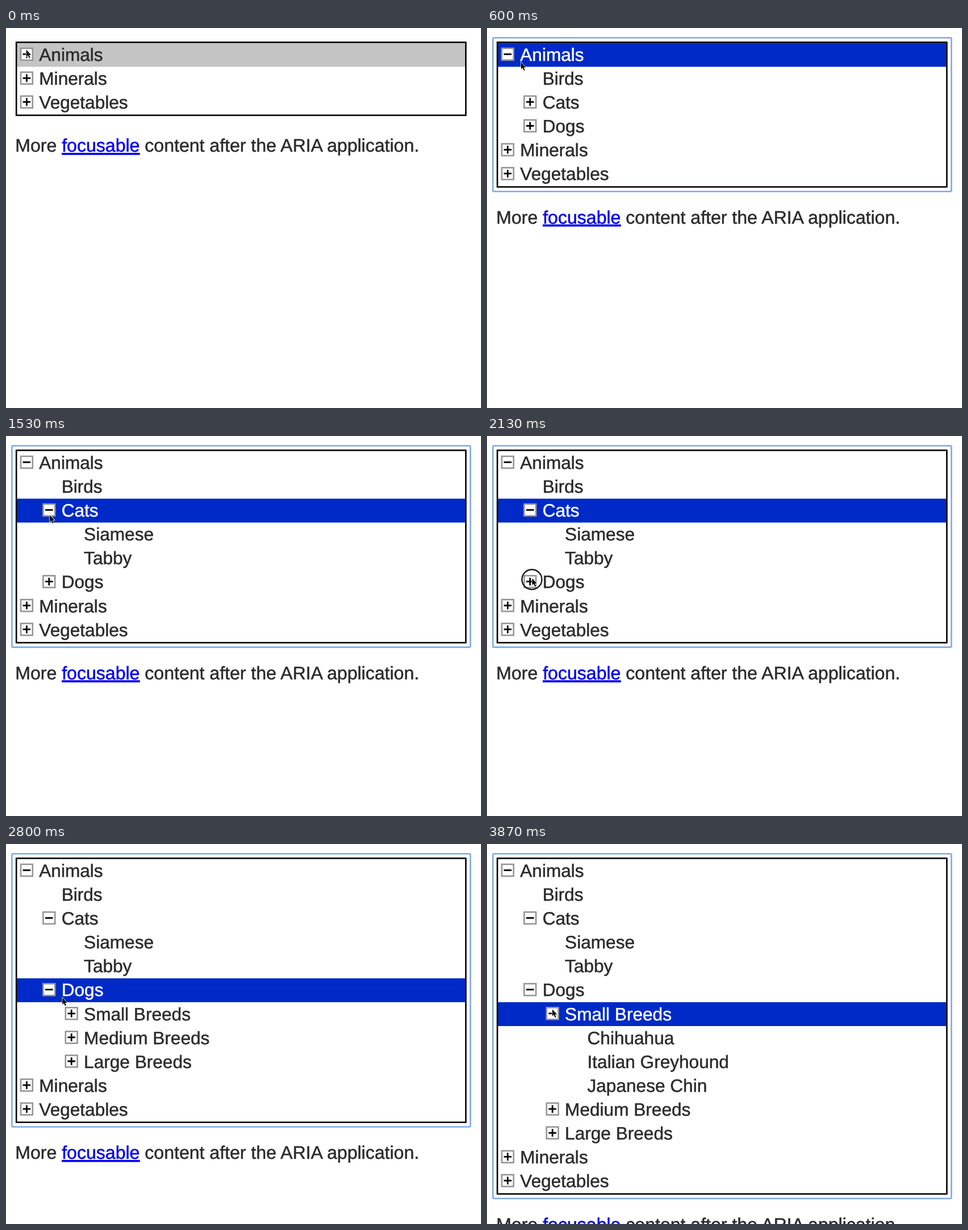
These frames come from a looping animation (836 by 670 pixels, 3.94 s). An HTML page:

```html
<!DOCTYPE html>
<html lang="en">
<head>
<meta charset="utf-8">
<title>Tree view</title>
<style>
  html, body { margin: 0; width: 100%; height: 100%; overflow: hidden; background: #fff; }
  svg { display: block; font: 31.6px "Liberation Sans", Arial, sans-serif; }
  text { fill: #2b2b2b; stroke: #2b2b2b; stroke-width: .5px; text-rendering: geometricPrecision; }
  .active { fill: #fff; stroke: #fff; }
  .footer { font-size: 32.05px; }
  .link { fill: #00e; stroke: #00e; text-decoration: underline 1.6px; text-underline-offset: 2px; }
</style>
</head>
<body>
<svg id="stage" width="836" height="670" viewBox="0 0 836 670"></svg>
<script>
const LOOP = 3940, TICK = 200 / 3;
const TOP = 26.3, ROW = 42.1, INDENT = 39.4;
const stage = document.getElementById('stage');

// Times below are in ticks of 1/15 s.
const leaf = name => ({ name });
const branch = (name, opensAt = Infinity, ...children) => ({ name, opensAt, children });
const tree = [
  branch('Animals', 4,
    leaf('Birds'),
    branch('Cats', 22, leaf('Siamese'), leaf('Tabby')),
    branch('Dogs', 34,
      branch('Small Breeds', 53, leaf('Chihuahua'), leaf('Italian Greyhound'), leaf('Japanese Chin')),
      branch('Medium Breeds'),
      branch('Large Breeds'))),
  branch('Minerals'),
  branch('Vegetables')
];
const selections = [[0, 'Animals'], [22, 'Cats'], [34, 'Dogs'], [53, 'Small Breeds']];
const presses = [[1, 4], [21, 22], [31, 34], [51, 53]];
const path = [
  [0, 36, 38.5], [6, 36, 38.5], [9, 60, 60.5], [14, 76, 98], [19, 76, 122.5],
  [22, 76, 122.5], [26, 80, 190], [30, 79.5, 251], [34, 79.5, 251],
  [41, 97, 268], [49, 115, 291.5], [60, 115, 291.5]
];

function pointerAt(tick) {
  const i = path.findIndex(p => p[0] > tick);
  const [t0, x0, y0] = path[i - 1], [t1, x1, y1] = path[i];
  const k = (tick - t0) / (t1 - t0);
  return [x0 + (x1 - x0) * k, y0 + (y1 - y0) * k];
}

function visibleRows(nodes, tick, depth = 0) {
  return nodes.flatMap(node => {
    const open = tick >= node.opensAt;
    return [{ ...node, depth, open }, ...(open ? visibleRows(node.children, tick, depth + 1) : [])];
  });
}

const rect = (x, y, right, bottom, attrs) =>
  `<rect x="${x}" y="${y}" width="${right - x}" height="${bottom - y}" ${attrs}/>`;

function icon(x, y, open) {
  return rect(x - 10.4, y - 10.4, x + 10.4, y + 10.4, 'fill="#fff" stroke="#959595" stroke-width="2.6"') +
    `<path d="M${x - 6.8} ${y}h13.6${open ? '' : `M${x} ${y - 6.8}v13.6`}" stroke="#000" stroke-width="2.8"/>`;
}

function drawRow(row, i, selected, focused) {
  const y = TOP + i * ROW, x = row.depth * INDENT;
  const active = row.name === selected;
  return (active ? rect(19, y, 808.5, y + ROW, `fill="${focused ? '#002ac8' : '#c4c4c4'}"`) : '') +
    (row.children ? icon(36.4 + x, y + 19.9, row.open) : '') +
    `<text x="${58.3 + x}" y="${y + 31.6}"${active && focused ? ' class="active"' : ''}>${row.name}</text>`;
}

function render(tick) {
  const rows = visibleRows(tree, tick);
  const focused = tick >= 4;
  const selected = selections.findLast(([t]) => tick >= t)[1];
  const bottom = TOP + rows.length * ROW;
  const [x, y] = pointerAt(tick);
  const pressed = presses.some(([from, to]) => tick >= from && tick < to);

  stage.innerHTML =
    (focused ? rect(10.4, 17.3, 817.3, bottom + 9.3, 'rx="2" fill="none" stroke="#7caaeb" stroke-width="2.6"') : '') +
    rows.map((row, i) => drawRow(row, i, selected, focused)).join('') +
    rect(18.2, 25.2, 809.3, bottom + 1.3, 'fill="none" stroke="#000" stroke-width="2.6"') +
    `<text class="footer" x="16.3" y="${bottom + 65.8}">More <tspan class="link">focusable</tspan> content after the ARIA application.</text>` +
    (pressed ? `<circle cx="${x - .5}" cy="${y + 2}" r="17.5" fill="none" stroke="#1c1c1c" stroke-width="2.4"/>` : '') +
    `<path transform="translate(${x} ${y})" d="M0 0V12L2.6 9.6L4.8 14.6L6.7 13.8L4.6 9H8.2Z"
      fill="#000" stroke="#fff" stroke-width="1.4" paint-order="stroke"/>`;
}

const start = performance.now();
let shown = -1;
function frame() {
  const time = (performance.now() - start) % LOOP;
  const tick = Math.floor((time + 4) / TICK);
  if (tick !== shown) render(shown = tick);
  requestAnimationFrame(frame);
}
frame();
</script>
</body>
</html>
```
